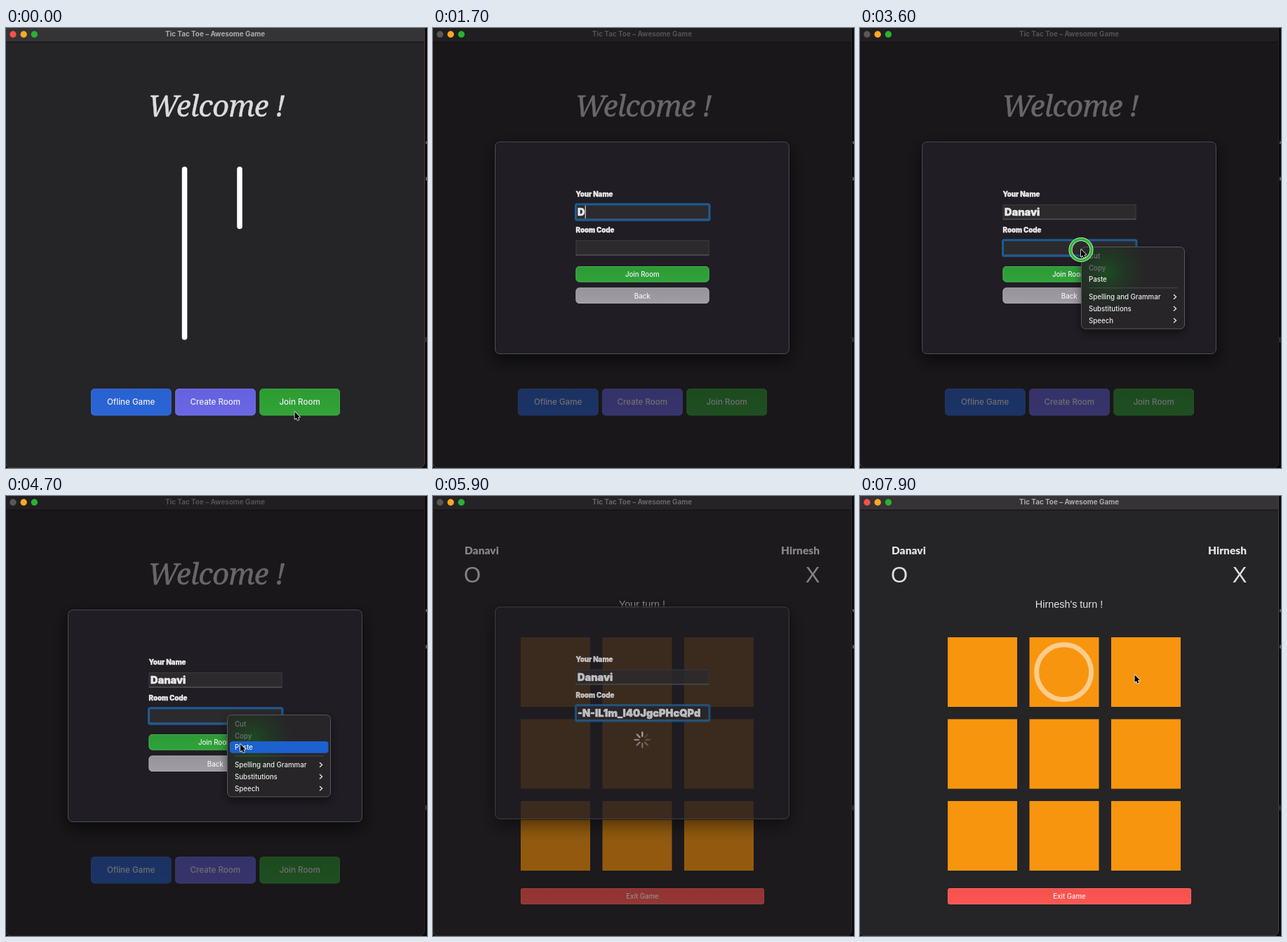
Recreate the animation shown at these times as an HTML page with a canvas. Size 600 by 626 pixels, loop 8 s.

```html
<!DOCTYPE html>
<html lang="en">
<head>
<meta charset="utf-8">
<title>Tic Tac Toe</title>
<style>
  html, body { margin: 0; width: 100%; height: 100%; overflow: hidden; background: #0b0a0b; }
  canvas { display: block; width: 600px; height: 626px; }
</style>
</head>
<body>
<canvas id="stage"></canvas>
<script>
const W = 600, H = 626, LOOP = 8000;
const UI = 'Inter, Roboto, sans-serif';
const ARIAL = '"Liberation Sans", Arial, sans-serif';
const HAND = 'Lato, "Open Sans", sans-serif';
const ME = 'Danavi', RIVAL = 'Hirnesh', CODE = '-N-IL1m_I40JgcPHcQPd';
const KEYS = [1700, 1800, 2000, 2100, 2300, 2400];

const canvas = document.getElementById('stage');
const ratio = window.devicePixelRatio || 1;
canvas.width = W * ratio;
canvas.height = H * ratio;
const c = canvas.getContext('2d');

const clamp = v => Math.max(0, Math.min(1, v));
const span = (t, a, b) => clamp((t - a) / (b - a));
const ease = p => p * p * (3 - 2 * p);
const within = (t, a, b) => t >= a && t < b;

function box(x, y, w, h, r, fill, stroke, lw = 1) {
  c.beginPath();
  c.roundRect(x, y, w, h, r);
  if (fill) { c.fillStyle = fill; c.fill(); }
  if (stroke) { c.strokeStyle = stroke; c.lineWidth = lw; c.stroke(); }
}

// "fat" outlines the glyphs to make heavy lettering heavier
function text(str, x, y, font, color, align = 'left', fat = 0) {
  c.font = font;
  c.fillStyle = color;
  c.textAlign = align;
  c.fillText(str, x, y);
  if (fat) {
    c.lineJoin = 'round';
    c.strokeStyle = color;
    c.lineWidth = fat;
    c.strokeText(str, x, y);
  }
  return c.measureText(str).width;
}

function line(x1, y1, x2, y2, color, lw) {
  c.beginPath();
  c.moveTo(x1, y1);
  c.lineTo(x2, y2);
  c.strokeStyle = color;
  c.lineWidth = lw;
  c.stroke();
}

function circle(x, y, r, fill, stroke, lw) {
  c.beginPath();
  c.arc(x, y, r, 0, Math.PI * 2);
  if (fill) { c.fillStyle = fill; c.fill(); }
  if (stroke) { c.strokeStyle = stroke; c.lineWidth = lw; c.stroke(); }
}

function shade(y, h, top, bottom) {
  const g = c.createLinearGradient(0, y, 0, y + h);
  g.addColorStop(0, top);
  g.addColorStop(1, bottom);
  return g;
}

function drawWindow() {
  c.fillStyle = '#0b0a0b';
  c.fillRect(0, 0, W, H);
  c.fillStyle = '#5a585c';
  c.fillRect(598, 161, 2, 4);
  c.fillRect(598, 212, 2, 5);
  c.fillRect(598, 440, 1, 7);
  box(-0.5, -6, 597, 632, 8, '#252426', '#454347', 1);
  c.fillStyle = '#353336';
  c.fillRect(0, 0, 596, 20);
  c.fillStyle = '#0e0d0e';
  c.fillRect(0, 19.5, 596, 1);
  text('Tic Tac Toe – Awesome Game', 298, 12.3, '700 9.9px ' + UI, '#adabae', 'center');
}

function drawLights(modal) {
  circle(10, 9, 4.7, modal ? '#59575a' : '#fa504b');
  circle(25.2, 9, 4.7, '#f9a922');
  circle(40.4, 9, 4.7, '#29b233');
}

function bigButton(x, label, top, bottom, edge) {
  box(x, 513.3, 114.5, 38, 5, shade(513, 38, top, bottom));
  box(x + 0.5, 513.8, 113.5, 37, 4.5, null, edge);
  text(label, x + 57.1, 536, '500 11.6px ' + UI, '#eeedf3', 'center');
}

function drawWelcome(t) {
  c.letterSpacing = '-0.9px';
  text('Welcome !', 299.5, 125.5, 'italic 500 42px "Noto Serif", "Liberation Serif", serif',
    '#dddcdd', 'center', 0.4);
  c.letterSpacing = '0px';
  c.lineCap = 'round';
  const bars = [[254.5, 201, 0, 1], [333, 201, 0, 1], [175, 281, 1, 0], [175, 359.5, 1, 0]];
  bars.forEach(([x, y, dx, dy], i) => {
    const p = clamp(1.338 + t / 500 - i);
    if (p > 0) line(x, y, x + dx * 239 * p, y + dy * 239 * p, '#ffffff', 7.6);
  });
  c.lineCap = 'butt';
  bigButton(121, 'Ofline Game', '#2861d0', '#2b64d6', '#3b6fd6');
  bigButton(241.2, 'Create Room', '#6561df', '#6a67e5', '#7572e5');
  bigButton(361.5, 'Join Room', '#2d9b32', '#32a438', '#3fa944');
}

function drawGame(t) {
  const moved = t >= 7550;
  text(ME, 45, 82.5, '900 15.5px ' + HAND, '#e2e1e2');
  text(RIVAL, 551, 82.5, '900 15.5px ' + HAND, '#e2e1e2', 'right');
  text('O', 44, 123, '31px ' + ARIAL, '#dfdedf');
  text('X', 551.5, 123, '31px ' + ARIAL, '#dfdedf', 'right');
  text(moved ? RIVAL + "'s turn !" : 'Your turn !', 298, 159, '14.4px ' + ARIAL, '#e6e5e6', 'center');
  c.fillStyle = '#f8950e';
  for (let i = 0; i < 9; i++) {
    c.fillRect(125 + (i % 3) * 116.5, 201 + Math.floor(i / 3) * 116.5, 99, 99);
  }
  if (moved) {
    const a = 0.52 * span(t, 7550, 7900);
    circle(290.6, 250.6, 39, null, `rgba(255,255,255,${a})`, 7);
  }
  box(125, 558, 347, 23, 3, shade(558, 23, '#f9504c', '#f95753'));
  box(125.5, 558.5, 346, 22, 3, null, '#fa6a66');
  text('Exit Game', 298.5, 573.2, '500 9.7px ' + UI, '#fbecec', 'center');
}

function field(y, label, value, focus, caret) {
  text(label, 203.5, y - 11.3, '900 9.7px ' + UI, '#e9e8ea', 'left', 0.35);
  c.fillStyle = '#2c2a2d';
  c.fillRect(203.5, y, 190, 21.5);
  c.strokeStyle = '#3d3b3f';
  c.lineWidth = 1;
  c.strokeRect(204, y + 0.5, 189, 20.5);
  line(203.5, y + 21, 393.5, y + 21, '#605d63', 1);
  if (focus > 0) {
    c.save();
    c.globalAlpha *= focus;
    box(203.5, y - 0.3, 190.5, 22.5, 2, null, '#1c5c93', 3);
    c.restore();
  }
  const w = text(value, 206, y + 16.2, '900 14.5px ' + UI, '#e8e7e9', 'left', 0.5);
  if (caret) {
    c.fillStyle = '#f0f0f0';
    c.fillRect(206.2 + w, y + 1.5, 1, 18.5);
  }
}

function smallButton(y, label, top, bottom, edge) {
  box(203.5, y, 190, 22.5, 5, shade(y, 22, top, bottom));
  box(204, y + 0.5, 189, 21.5, 4.5, null, edge);
  text(label, 298.3, y + 15, '500 9.7px ' + UI, '#f4f3f5', 'center');
}

function drawSpinner(t) {
  const head = Math.floor(t / 100) + 5;
  c.lineCap = 'round';
  for (let i = 0; i < 8; i++) {
    const age = (((head - i) % 8) + 8) % 8;
    const a = i * Math.PI / 4 - Math.PI / 2;
    const x = Math.cos(a), y = Math.sin(a);
    line(298.3 + x * 5.2, 351 + y * 5.2, 298.3 + x * 10.8, 351 + y * 10.8,
      `rgba(215,213,218,${0.9 - age * 0.1})`, 2.3);
  }
  c.lineCap = 'butt';
}

function sheetAlpha(t) {
  if (t < 5000) return ease(span(t, 550, 950));
  return 1 - ease(span(t, 5820, 6080));
}

function drawSheet(t, alpha) {
  c.save();
  c.globalAlpha = alpha;
  c.fillStyle = 'rgba(17,15,17,0.57)';
  c.beginPath();
  c.roundRect(0, -6, 597, 632, 8);
  c.fill();
  c.translate(0, -18 * (1 - alpha));

  // the shadow stays outside the panel so it does not darken a fading one
  c.save();
  c.beginPath();
  c.rect(0, 0, W, H + 40);
  c.roundRect(88, 161.5, 420, 302.5, 7);
  c.clip('evenodd');
  c.shadowColor = 'rgba(0,0,0,0.6)';
  c.shadowBlur = 24 * ratio;
  c.shadowOffsetY = 9 * ratio;
  box(88, 161.5, 420, 302.5, 7, '#201d24');
  c.restore();
  box(88, 161.5, 420, 302.5, 7, '#201d24');
  box(87.5, 161, 421, 303.5, 7.5, null, '#0c0b0d', 1);
  box(88.5, 162, 419, 301.5, 6.5, null, '#504d53', 1);

  const typed = KEYS.filter(k => t >= k).length;
  const swap = span(t, 2600, 2720);
  field(251, 'Your Name', ME.slice(0, typed), span(t, 1250, 1400) * (1 - swap), within(t, 1350, 2600));
  field(302, 'Room Code', t >= 5100 ? CODE : '', swap, false);
  if (t < 5500) {
    smallButton(339, 'Join Room', '#2c9a35', '#30a33b', '#46b04f');
    smallButton(369.5, 'Back', '#96939a', '#a09da4', '#aba8ae');
  } else {
    drawSpinner(t);
  }
  c.restore();
}

function drawMenu(t) {
  const alpha = t < 3550 ? 0 : 1 - span(t, 5020, 5250);
  if (!alpha) return;
  c.save();
  c.globalAlpha = alpha;
  c.save();
  c.shadowColor = 'rgba(0,0,0,0.55)';
  c.shadowBlur = 14 * ratio;
  c.shadowOffsetY = 5 * ratio;
  box(315.5, 311.5, 147, 116.5, 6, '#272528');
  c.restore();
  const glow = c.createRadialGradient(352, 347, 4, 352, 347, 58);
  glow.addColorStop(0, 'rgba(26,84,32,0.75)');
  glow.addColorStop(1, 'rgba(30,60,34,0)');
  box(315.5, 311.5, 147, 116.5, 6, glow, '#5a585c', 1);

  const blink = within(t, 4900, 4960);
  if (t >= 4500 && !blink) box(319, 349, 140.5, 16.8, 4, '#1c61cf');
  const font = '500 9.7px ' + UI;
  text('Cut', 326, 327.5, font, '#737176');
  text('Copy', 326, 344.5, font, '#737176');
  text('Paste', 326, 361, font, '#f2f1f3');
  line(326, 369.8, 452.5, 369.8, '#4b494d', 1);
  ['Spelling and Grammar', 'Substitutions', 'Speech'].forEach((item, i) => {
    const y = 382.5 + i * 16.8;
    text(item, 326, y + 3.6, font, '#ebeaec');
    c.beginPath();
    c.moveTo(447, y - 3.2);
    c.lineTo(450.6, y);
    c.lineTo(447, y + 3.2);
    c.strokeStyle = '#ebeaec';
    c.lineWidth = 1.3;
    c.stroke();
  });
  c.restore();
}

// pointer path: [time, x, y]; it is hidden outside the listed stretches
const PATHS = [
  [[0, 411.5, 546], [250, 409, 541], [1000, 409, 541]],
  [[2600, 391, 522], [3050, 388, 291], [3240, 388, 291], [3300, 313, 314], [3580, 315, 315],
   [4350, 315, 315], [4680, 334, 353], [5400, 334, 353]],
  [[6850, 334, 365], [7300, 329, 286], [7700, 331, 286], [7900, 391.5, 254.5], [8001, 391.5, 254.5]]
];
const CLICKS = [[250, 520], [3500, 3800], [4800, 5020], [7330, 7600]];

function pointerAt(t) {
  const path = PATHS.find(p => within(t, p[0][0], p[p.length - 1][0]));
  if (!path) return null;
  const i = path.findIndex(k => k[0] > t);
  const [t0, x0, y0] = path[i - 1], [t1, x1, y1] = path[i];
  const p = ease(span(t, t0, t1));
  return [x0 + (x1 - x0) * p, y0 + (y1 - y0) * p];
}

function drawPointer(t) {
  const pos = pointerAt(t);
  if (!pos) return;
  const [x, y] = pos;
  const click = CLICKS.find(k => within(t, k[0], k[1]));
  if (click) {
    c.save();
    c.globalAlpha = 1 - span(t, click[1] - 90, click[1]);
    circle(x, y + 0.5, 15, null, '#e3f4e2', 5);
    circle(x, y + 0.5, 15, null, '#29b730', 3.4);
    c.restore();
  }
  c.save();
  c.translate(x, y);
  c.beginPath();
  [[0, 0], [0, 10.6], [2.4, 8.4], [4, 12], [5.9, 11.2], [4.3, 7.7], [7.5, 7.6]]
    .forEach(p => c.lineTo(p[0], p[1]));
  c.closePath();
  c.lineJoin = 'round';
  c.strokeStyle = '#f2f2f2';
  c.lineWidth = 1.5;
  c.stroke();
  c.fillStyle = '#000';
  c.fill();
  c.restore();
}

function draw(t) {
  c.setTransform(ratio, 0, 0, ratio, 0, 0);
  const alpha = sheetAlpha(t);
  drawWindow();
  if (t < 5800) drawWelcome(t); else drawGame(t);
  if (alpha > 0) drawSheet(t, alpha);
  drawLights(within(t, 600, 6020));
  drawMenu(t);
  drawPointer(t);
}

const start = performance.now();
function tick() {
  draw((performance.now() - start) % LOOP);
  requestAnimationFrame(tick);
}
tick();
</script>
</body>
</html>
```
